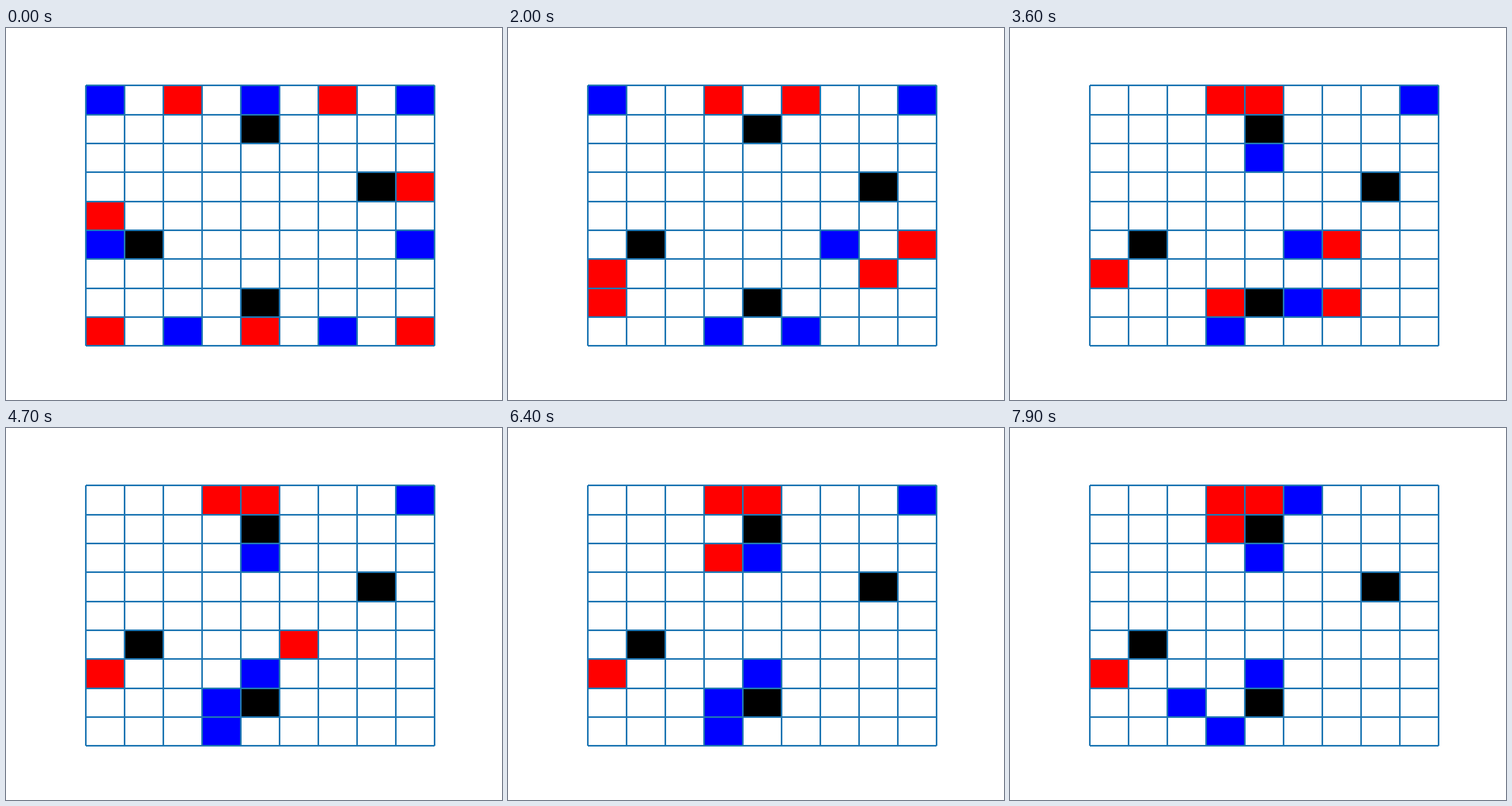
Animation, 640 px wide and 480 px high, one loop 8 s. Source, as a matplotlib script:

```python
import matplotlib.pyplot as plt
from matplotlib.animation import FuncAnimation
from matplotlib.patches import Rectangle

SIZE = 9
LAST = SIZE - 1
FRAMES, INTERVAL = 80, 100
SIDES = ["blue", "red"]

# Routes are waypoints (row, column digits); pieces walk between them.
ROUTES = {
    "blue": "58 67, 50 61, 82 83, 86 85, 61 70, 67 66 55, 00 24, 85 75, "
            "55 64 73, 75 64, 73" + " 72 73" * 5 + ", 08 05, 73 72 73 72",
    "red": "38 58, 40 60, 88 68, 02 03, 80 70, 68 67, 06 04, 70 73, 67 76, "
           "58 56, 76 65, 56 55 54 55 53 23" + " 13 23" * 5 + " 13",
}


def opposite(pos):
    return LAST - pos[0], LAST - pos[1]


WALLS = {p for w in [(1, 4), (5, 1)] for p in (w, opposite(w))}


def toward(a, b):
    return a + (b > a) - (b < a)


def walk(pos, goal):
    """Yield single steps, along the column first unless a wall blocks it."""
    while pos != goal:
        (r, c), (gr, gc) = pos, goal
        step = toward(r, gr), c
        if r == gr or step in WALLS:
            step = r, toward(c, gc)
        yield pos, step
        pos = step


def moves(side):
    for route in ROUTES[side].split(", "):
        points = [tuple(map(int, p)) for p in route.split()]
        for a, b in zip(points, points[1:]):
            yield from walk(a, b)


def setup():
    board = {(4, 0): "red", (5, 0): "blue", (3, 8): "red", (5, 8): "blue"}
    for i in range(0, SIZE, 2):
        board[0, i] = SIDES[i // 2 % 2]
        board[LAST, i] = SIDES[1 - i // 2 % 2]
    return board


def enemies(board, pos):
    r, c = pos
    near = [(r - 1, c), (r + 1, c), (r, c - 1), (r, c + 1)]
    return sum(n in board and board[n] != board[pos] for n in near)


def play():
    """Return the board after every turn, with the sides taking turns."""
    board = setup()
    boards = [board]
    queues = [moves(side) for side in SIDES]
    for turn in range(FRAMES - 1):
        old, new = next(queues[turn % 2])
        board = dict(board)
        board[new] = board.pop(old)
        # A piece touched by two enemies is taken.
        board = {p: s for p, s in board.items() if enemies(board, p) < 2}
        boards.append(board)
    return boards


boards = play()

fig, ax = plt.subplots(figsize=(6.4, 4.8), dpi=100)
ax.axis("off")

tiles = {}
for r in range(SIZE):
    for c in range(SIZE):
        color = "black" if (r, c) in WALLS else "white"
        tile = Rectangle((c, r), 1, 1, facecolor=color, linewidth=0)
        tiles[r, c] = ax.add_patch(tile)

grid = dict(color="tab:blue", lw=1.5, solid_capstyle="butt")
for i in range(SIZE + 1):
    ax.plot([0, SIZE], [i, i], **grid)
    ax.plot([i, i], [0, SIZE], **grid)

pad = 0.05 * SIZE
ax.set_xlim(-pad, SIZE + pad)
ax.set_ylim(SIZE + pad, -pad)


def update(turn):
    for pos, tile in tiles.items():
        if pos not in WALLS:
            tile.set_facecolor(boards[turn].get(pos, "white"))
    return list(tiles.values())


anim = FuncAnimation(fig, update, frames=FRAMES, interval=INTERVAL, repeat=True)
plt.show()
```
